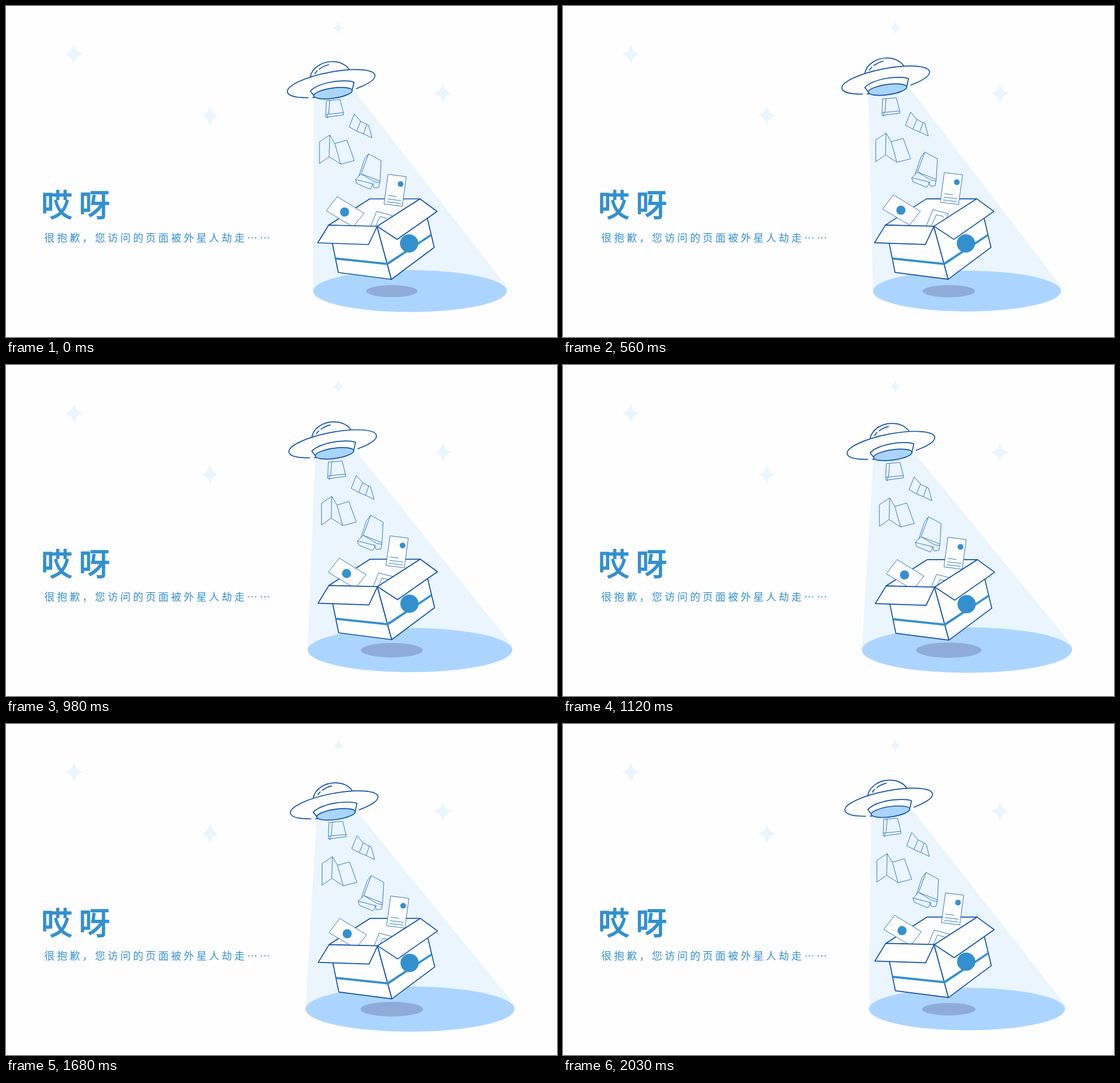
Write an HTML page that moves like this. It is 965 by 580 pixels and loops after 2.1 s.

```html
<!DOCTYPE html>
<html lang="zh-CN">
<head>
<meta charset="utf-8">
<title>哎呀</title>
<style>
  html, body { margin: 0; width: 100%; height: 100%; overflow: hidden; background: #fefefe; }
  svg { display: block; width: 965px; height: 580px; }
  text { font-family: "Noto Sans CJK SC", "Noto Sans CJK", sans-serif; fill: #3390cf; }
  .title { font-size: 54px; font-weight: 500; letter-spacing: 12px; stroke: #3390cf; stroke-width: 1.8px; stroke-linejoin: round; }
  .note { font-size: 18px; font-weight: 300; letter-spacing: 4.2px; }
  .dark { fill: #fefefe; stroke: #0d52a3; stroke-width: 1.7; stroke-linejoin: round; stroke-linecap: round; }
  .thin { fill: none; stroke: #3179c2; stroke-width: 1; stroke-linejoin: round; }
  .paper { fill: #fefefe; }
  .open { fill: none; }
  .blue { fill: #3390cf; stroke: none; }
</style>
</head>
<body>
<svg viewBox="0 0 965 580">
  <g id="stars" fill="#eaf6fd"></g>
  <text class="title" x="62" y="369">哎呀</text>
  <text class="note" x="67" y="413">很抱歉，您访问的页面被外星人劫走……</text>

  <polygon id="beam" fill="#eaf5fd"/>
  <ellipse id="pool" cx="707.5" cy="499.5" fill="#abd5ff"/>
  <ellipse id="shadow" cx="675.7" cy="499.7" fill="#8facd9"/>

  <g id="boxBack">
    <path class="dark" d="M565 384L637 338H725L650 387Z"/>
  </g>

  <g id="items" class="thin">
    <!-- notebook -->
    <path d="M561 166L585 164L591 187L560 190ZM567 165L565 190M560 190V195L591 191V187M563 190V197"/>
    <!-- folded leaflet -->
    <path d="M610 189L621 202L635 209L641 231L626 224L614 219L601 212ZM621 202L614 219M632 207L626 224"/>
    <!-- open brochure -->
    <path d="M549 238L567 226L566 264L549 276ZM567 226L576 241L597 235L610 271L586 277L566 264M576 241L586 277"/>
    <!-- carton -->
    <path d="M635 259L657 271L655 307L622 294ZM635 259L628 268L618 298M622 294L612 304L614 311L638 321L644 312L612 304M655 307L653 318L645 319L641 312M622 294L645 308L655 310"/>
    <!-- cards -->
    <path class="paper" d="M669 295L701 299L694 351L662 347Z"/>
    <path d="M669 332L684 334M668 338L692 341M667 343L691 346"/>
    <circle class="blue" cx="691" cy="312" r="5"/>
    <path class="paper" d="M580 334L627 363L608 387L561 359Z"/>
    <circle class="blue" cx="593" cy="361" r="8"/>
    <path class="paper" d="M649 360L676 367L664 398L637 390Z"/>
    <path d="M647 387L655 369L668 372"/>
  </g>

  <g id="boxFront">
    <path class="dark" d="M568 398L650 387L675 479L582 467Z"/>
    <path class="dark" d="M650 387L735 360L750 423L675 479Z"/>
    <path class="blue" d="M577 440.500L667 450L744 399.500L745 403L668.500 454L578 444.500Z"/>
    <circle class="blue" cx="706" cy="416" r="16"/>
    <path class="dark" d="M565 384L650 386L635 418L546 415Z"/>
    <path class="dark" d="M650 386L725 338L755 360L685 409Z"/>
  </g>

  <g id="ufo" class="dark">
    <path d="M533 124C536 108 553 98 570 97.500C583 97 595 102 601 111"/>
    <ellipse cx="569.500" cy="136" rx="78" ry="20" transform="rotate(-10.900 569.500 136)"/>
    <path class="open" d="M541 118.500Q542.500 116 545 113.500M549 110.500Q556 105 565 103"/>
    <!-- gaps in the rim beside the hatch -->
    <path d="M533 155V163M609.500 141V149" style="stroke:#fefefe;stroke-width:7;stroke-linecap:butt"/>
    <path d="M540 158L533 149Q543 138 571 133Q597 129 609.500 133.500L606 149Z"/>
    <ellipse cx="572.700" cy="152.700" rx="34" ry="9" transform="rotate(-8 572.700 152.700)" style="fill:#a9d4fd"/>
  </g>
</svg>
<script>
  const LOOP = 2100, STEP = 70, TROUGH = 300, PEAK = 1370;
  const $ = id => document.getElementById(id);
  const lerp = (a, b, k) => a + (b - a) * k;

  // Steady drift from rest down to low, up to high, and back to rest.
  function swing(t, rest, low, high) {
    if (t < TROUGH) return lerp(rest, low, t / TROUGH);
    if (t < PEAK) return lerp(low, high, (t - TROUGH) / (PEAK - TROUGH));
    return lerp(high, rest, (t - PEAK) / (LOOP - PEAK));
  }

  function star(x, y, w, h) {
    const a = w * 0.16, b = h * 0.16;
    return `<path transform="translate(${x} ${y})" d="M0 ${-h}Q${a} ${-b} ${w} 0Q${a} ${b} 0 ${h}Q${-a} ${b} ${-w} 0Q${-a} ${-b} 0 ${-h}"/>`;
  }

  $("stars").innerHTML = star(119, 84.5, 16, 19) + star(357, 192, 15.5, 19) +
    star(582, 38, 10, 12) + star(765, 153, 16, 19);

  function move(id, x, y) {
    $(id).setAttribute("transform", `translate(${x} ${y})`);
  }

  function resize(id, r, ratio) {
    $(id).setAttribute("rx", r);
    $(id).setAttribute("ry", r * ratio);
  }

  function draw(t) {
    const ufoX = swing(t, 0, -8.6, 9), ufoY = swing(t, 0, -11.4, 9.8);
    const boxX = swing(t, 0, -1, 1.5), boxY = swing(t, 0, -1.6, 4.5);
    const poolR = swing(t, 169.5, 155.5, 193);

    move("ufo", ufoX, ufoY);
    move("items", swing(t, 0, -4.2, 8), swing(t, 0, -7.8, 11.3));
    move("boxBack", boxX, boxY);
    move("boxFront", boxX, boxY);
    resize("pool", poolR, 0.2165);
    resize("shadow", swing(t, 45.2, 40.8, 62), 0.235);

    const left = 707.5 - poolR, right = 707.5 + poolR;
    $("beam").setAttribute("points", [
      539 + ufoX, 156 + ufoY, 611.5 + ufoX, 150 + ufoY,
      right - 0.5, 491, right, 499.5, left, 499.5
    ].join(" "));
  }

  const start = performance.now();
  function tick() {
    const elapsed = (performance.now() - start) % LOOP;
    draw(Math.floor(elapsed / STEP) * STEP);
    requestAnimationFrame(tick);
  }
  tick();
</script>
</body>
</html>
```
